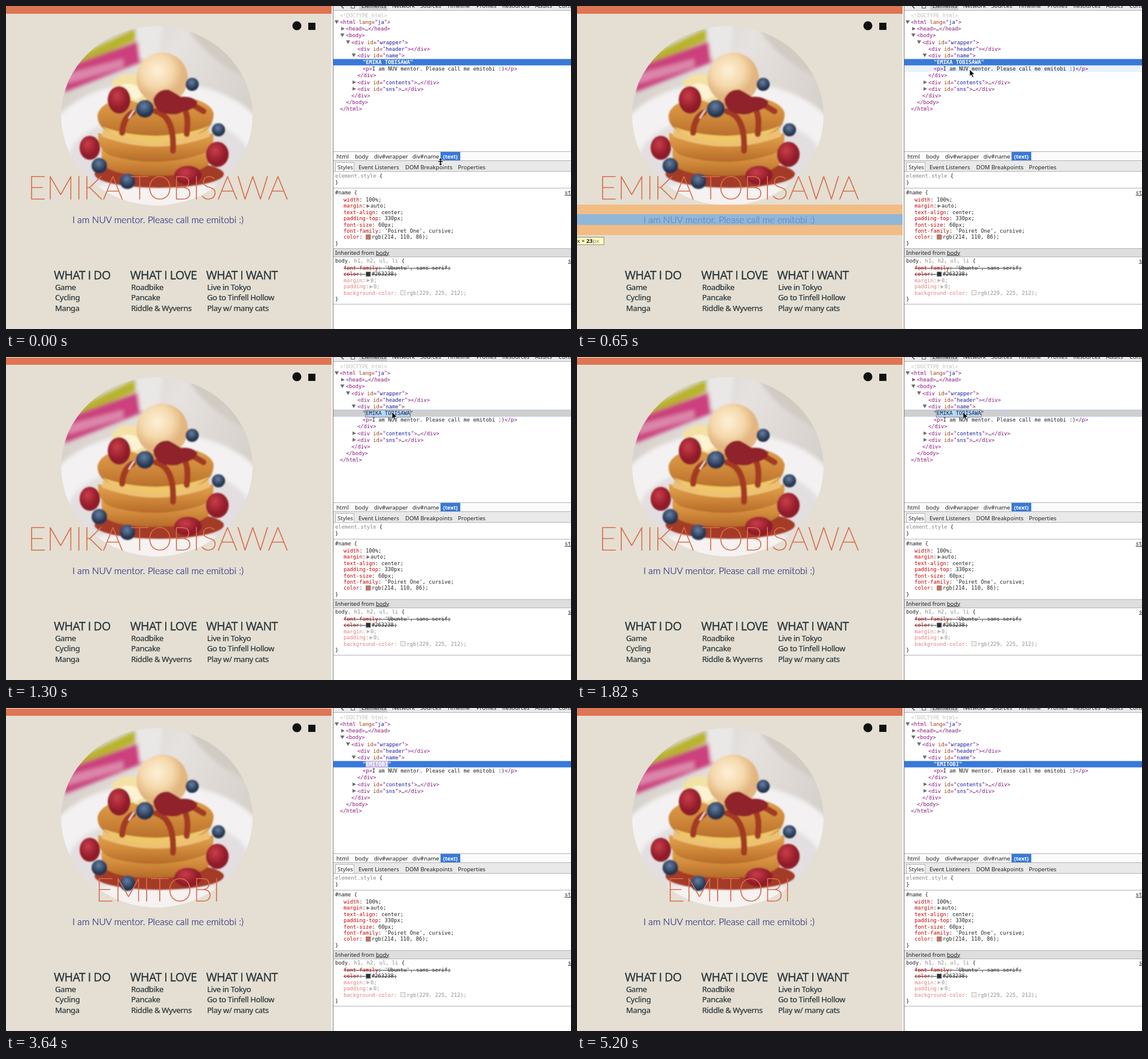
Recreate the animation shown at these times as an HTML page. Size 944 by 540 pixels, loop 5330 ms.

```html
<!DOCTYPE html>
<html lang="en">
<head>
<meta charset="utf-8">
<title>Editing a page in the inspector</title>
<style>
html, body { margin: 0; width: 100%; height: 100%; overflow: hidden; background: #fff; }
#stage { position: relative; width: 944px; height: 540px; overflow: hidden; }
svg { position: absolute; left: 0; top: 0; display: block; }
text { white-space: pre; }

/* web page */
.title { font: 200 53px Lato, sans-serif; letter-spacing: .5px; fill: #d96d4e; stroke: #d96d4e; stroke-width: 1px; text-anchor: middle; }
.intro { font: 300 15.6px Lato, sans-serif; fill: #23267f; stroke: #23267f; stroke-width: .2px; text-anchor: middle; }
.head { font: 500 19.5px "Open Sans", sans-serif; letter-spacing: -.5px; fill: #263238; stroke: #263238; stroke-width: .3px; }
.item { font: 13px "Noto Sans", sans-serif; letter-spacing: -.35px; fill: #263238; stroke: #263238; stroke-width: .2px; }

/* inspector */
.ui { font: 9.5px "Noto Sans", sans-serif; fill: #222; }
.tree, .css, .row { font: 8.75px "DejaVu Sans Mono", monospace; }
.tree { fill: #881280; }
.n { fill: #994500; }
.v { fill: #1a1aa6; }
.k { fill: #222; }
.css { fill: #222; }
.p { fill: #c80000; }
.dim { fill: #888; }
.bold { font-weight: bold; fill: #fff; }
.u { text-decoration: underline; }
.off { text-decoration: line-through; }
.line { stroke: #b4b4b4; }
.arrow { fill: #6e6e6e; }

.row { position: absolute; left: 547px; top: 89px; width: 397px; height: 10px; background: #cfcfcf; visibility: hidden; }
.row div { position: absolute; left: 49px; top: -.5px; display: flex; line-height: 11px; color: #333; }
.row b { font-weight: normal; color: #222; background: #fff; height: 11px; overflow: hidden; white-space: pre; box-shadow: 0 0 1px 1px #8c8c8c; }
#picked b { background: #b3d6fd; }

/* timeline: 41 steps of 130 ms */
.a { animation: 5.33s step-end infinite; }
#before, #oldNode { animation-name: before; }
#after, #newNode { animation-name: after; }
#edge { animation-name: edge; }
#resize { animation-name: resize; }
#cursor { animation-name: move, pointer; }
#hover { animation-name: hover; }
#whole { animation-name: whole; }
#para { animation-name: para; }
#picked { animation-name: picked; }
#typing { animation-name: typing; }
#typed { animation-name: type; }
#flash { animation-name: flash; }

@keyframes before { 0% { visibility: visible } 65.8%, 100% { visibility: hidden } }
@keyframes after { 0% { visibility: hidden } 65.8%, 100% { visibility: visible } }
@keyframes edge { 0%, 90.2%, 100% { visibility: hidden } 14.6% { visibility: visible } }
@keyframes resize { 0% { visibility: visible } 2.4%, 100% { visibility: hidden } }
@keyframes pointer {
  0%, 39%, 90.2%, 100% { visibility: hidden }
  2.4%, 78% { visibility: visible }
}
@keyframes move {
  0%, 2.4% { transform: translate(722px, 236px) }
  4.8% { transform: translate(710px, 200px) }
  7.3% { transform: translate(692px, 163px) }
  9.7% { transform: translate(675px, 133px) }
  12.1% { transform: translate(656px, 106px) }
  14.6% { transform: translate(645px, 92px) }
  80.4% { transform: translate(636px, 101px) }
  82.9% { transform: translate(628px, 108px) }
  85.3% { transform: translate(618px, 116px) }
  87.8%, 100% { transform: translate(600px, 135px) }
}
@keyframes hover {
  0%, 14.6%, 87.8%, 100% { transform: translateY(-20px) }
  7.3% { transform: translateY(166.5px) }
  9.7% { transform: translateY(144.3px) }
  12.1%, 80.4% { transform: translateY(99.5px) }
}
@keyframes whole { 0%, 12.1%, 100% { visibility: hidden } 7.3% { visibility: visible } }
@keyframes para { 0%, 14.6%, 87.8%, 100% { visibility: hidden } 12.1%, 80.4% { visibility: visible } }
@keyframes picked { 0%, 39%, 100% { visibility: hidden } 24.3% { visibility: visible } }
@keyframes typing { 0%, 65.8%, 100% { visibility: hidden } 39% { visibility: visible } }
@keyframes type {
  0%, 39% { width: 1ch }
  43.9% { width: 2ch }
  46.3% { width: 3ch }
  51.2% { width: 4ch }
  53.6% { width: 5ch }
  58.5% { width: 6ch }
  60.9%, 100% { width: 7ch }
}
@keyframes flash {
  0%, 73.1%, 100% { opacity: 0 }
  65.8% { opacity: 1 }
  68.2% { opacity: .8 }
  70.7% { opacity: .4 }
}
</style>
</head>
<body>
<div id="stage">
<svg width="944" height="540" viewBox="0 0 944 540">
  <defs>
    <clipPath id="oval"><ellipse cx="252" cy="183.5" rx="160" ry="150"/></clipPath>
    <linearGradient id="room" x2="1" y2=".6"><stop stop-color="#cfc8c2"/><stop offset=".5" stop-color="#e6e2df"/><stop offset="1" stop-color="#d3cdc7"/></linearGradient>
    <linearGradient id="cake" x2="0" y2="1"><stop stop-color="#e0a452"/><stop offset=".5" stop-color="#d0893a"/><stop offset="1" stop-color="#b56b2a"/></linearGradient>
    <radialGradient id="ice" cx=".4" cy=".35"><stop stop-color="#fdf0d8"/><stop offset=".6" stop-color="#f5d9ac"/><stop offset="1" stop-color="#e3b681"/></radialGradient>
    <radialGradient id="red" cx=".4" cy=".35"><stop stop-color="#c93d49"/><stop offset="1" stop-color="#8f1a29"/></radialGradient>
    <radialGradient id="blue" cx=".45" cy=".35"><stop stop-color="#6480a6"/><stop offset="1" stop-color="#27364f"/></radialGradient>
    <filter id="soft"><feGaussianBlur stdDeviation="3"/></filter>
    <filter id="smooth"><feGaussianBlur stdDeviation=".8"/></filter>
  </defs>

  <!-- web page -->
  <rect width="544" height="540" fill="#e4dfd2"/>
  <rect width="544" height="13" fill="#de7553"/>
  <rect id="edge" class="a" width="544" height="1" fill="#f0e9e4"/>
  <circle cx="486" cy="33" r="7.5" fill="#111"/>
  <rect x="505" y="28" width="12" height="12" fill="#111"/>

  <g clip-path="url(#oval)">
    <rect x="90" y="30" width="325" height="306" fill="url(#room)"/>
    <g filter="url(#soft)">
      <path d="M120 84L216 38V58L112 102Z" fill="#b8b42c"/>
      <path d="M94 104L224 58 230 92 98 144Z" fill="#cb3f7d"/>
      <path d="M100 114L196 88V102L102 130Z" fill="#dc86aa"/>
      <path d="M216 30L262 30 256 82 224 92Z" fill="#eae7e7"/>
      <path d="M300 30Q330 90 420 130V30Z" fill="#d2cbc4"/>
      <ellipse cx="252" cy="232" rx="184" ry="106" fill="#f3f1f1"/>
      <ellipse cx="256" cy="256" rx="152" ry="74" fill="#e3dfe0"/>
      <ellipse cx="252" cy="318" rx="130" ry="26" fill="#f5f2f1"/>
    </g>
    <g filter="url(#smooth)">
      <ellipse cx="256" cy="281" rx="108" ry="23" fill="#a43a26"/>
      <path d="M159 240Q250 276 341 240V262Q322 284 250 284 176 284 161 264Z" fill="url(#cake)"/>
      <path d="M154 212Q250 250 346 212Q350 240 326 248 250 272 174 250 152 240 154 212Z" fill="url(#cake)"/>
      <path d="M162 206Q250 248 338 204L341 218Q250 252 160 218Z" fill="#edc173"/>
      <path d="M153 182Q160 150 250 148 340 150 347 180 346 208 318 214 250 232 182 214 152 206 153 182Z" fill="url(#cake)"/>
      <path d="M162 202Q200 216 250 217 306 215 340 200 320 222 250 228 182 224 162 202Z" fill="#efc768"/>
      <g fill="none" stroke="#a23a24" stroke-width="10" stroke-linecap="round" stroke-linejoin="round">
        <path d="M212 178Q196 186 194 212M250 176Q282 184 279 242M296 170Q306 180 302 214M310 164L330 176"/>
      </g>
      <path d="M176 130Q190 108 222 116L250 146 224 163 190 151Z" fill="#f3e1a6"/>
      <path d="M184 137Q210 118 234 148L216 157Z" fill="#fbf3d2"/>
      <circle cx="261" cy="121" r="43" fill="url(#ice)"/>
      <path d="M246 156Q254 138 272 140 284 146 292 152 310 150 320 160 316 174 296 176 286 184 268 180 248 176 246 156Z" fill="#8f2029"/>
      <g fill="url(#red)">
        <ellipse cx="189" cy="157" rx="19" ry="23"/>
        <ellipse cx="140" cy="237" rx="17" ry="20"/>
        <ellipse cx="353" cy="248" rx="19" ry="21"/>
        <ellipse cx="304" cy="283" rx="23" ry="16"/>
      </g>
      <g fill="url(#blue)">
        <circle cx="232" cy="172" r="15"/>
        <circle cx="311" cy="131" r="11"/>
        <circle cx="355" cy="207" r="11"/>
        <circle cx="156" cy="267" r="13"/>
        <circle cx="203" cy="293" r="13"/>
      </g>
      <path d="M205 188L214 174" stroke="#fff" stroke-width="2"/>
    </g>
  </g>

  <text id="before" class="title a" x="254" y="323">EMIKA TOBISAWA</text>
  <text id="after" class="title a" x="254" y="323">EMITOBI</text>
  <text class="intro" x="254" y="363">I am NUV mentor. Please call me emitobi :)</text>
  <g class="head">
    <text x="80" y="457">WHAT I DO</text>
    <text x="207.5" y="457">WHAT I LOVE</text>
    <text x="334.5" y="457">WHAT I WANT</text>
  </g>
  <g class="item">
    <text x="82" y="474.5">Game</text><text x="82" y="492.3">Cycling</text><text x="82" y="510">Manga</text>
    <text x="209" y="474.5">Roadbike</text><text x="209" y="492.3">Pancake</text><text x="209" y="510">Riddle &amp; Wyverns</text>
    <text x="336" y="474.5">Live in Tokyo</text><text x="336" y="492.3">Go to Tinfell Hollow</text><text x="336" y="510">Play w/ many cats</text>
  </g>

  <!-- element highlights -->
  <rect id="whole" class="a" width="544" height="540" fill="rgba(111,168,220,.7)"/>
  <g id="para" class="a">
    <path d="M0 332H544V348H0ZM0 366H544V383H0Z" fill="rgba(246,178,107,.75)"/>
    <rect y="348" width="544" height="18" fill="rgba(111,168,220,.72)"/>
    <rect x="-5" y="386.5" width="50" height="12.5" fill="#fffcc4" stroke="#8d8a72"/>
    <text class="ui" x="0" y="396">x × <tspan font-weight="bold">23</tspan><tspan class="dim">px</tspan></text>
  </g>

  <!-- inspector -->
  <rect x="544" width="400" height="540" fill="#fff"/>
  <path d="M546.5 0V540" stroke="#777"/>
  <rect x="547" width="397" height="7" fill="#e9e9e9"/>
  <rect x="590" width="47" height="7" fill="#cdcdcd"/>
  <path d="M547 7.5H944" class="line"/>
  <path d="M560 0L564 4" stroke="#444" stroke-width="1.6"/>
  <path d="M576.5 -4V3.5H582.5V-4" fill="none" stroke="#555"/>
  <g class="ui">
    <text x="594" y="2.5">Elements</text><text x="645" y="2.5">Network</text><text x="692" y="2.5">Sources</text>
    <text x="737" y="2.5">Timeline</text><text x="786" y="2.5">Profiles</text><text x="829" y="2.5">Resources</text>
    <text x="884" y="2.5">Audits</text><text x="923" y="2.5">Console</text>
  </g>

  <rect id="hover" class="a" x="547" width="397" height="11" fill="#e9f1fb"/>
  <rect x="547" y="88.6" width="397" height="10.7" fill="#3879d9"/>
  <rect id="flash" class="a" x="601" y="89" width="37.5" height="10" fill="#efc9e6"/>
  <path class="arrow" d="M549 24H556L552.5 30ZM560 35V41L566 38ZM558.5 46H565.5L562 52ZM568 57.5H575L571.5 63.5ZM577.5 79.5H584.5L581 85.5ZM579 124.5V130.5L585 127.5ZM579 135.5V141.5L585 138.5Z"/>
  <g class="tree">
    <text x="558" y="19" fill="#c0c0c0">&lt;!DOCTYPE html&gt;</text>
    <text x="558" y="30">&lt;html <tspan class="n">lang</tspan>="<tspan class="v">ja</tspan>"&gt;</text>
    <text x="568" y="41">&lt;head&gt;<tspan class="k">…</tspan>&lt;/head&gt;</text>
    <text x="568" y="52">&lt;body&gt;</text>
    <text x="577" y="63.5">&lt;div <tspan class="n">id</tspan>="<tspan class="v">wrapper</tspan>"&gt;</text>
    <text x="587" y="74.5">&lt;div <tspan class="n">id</tspan>="<tspan class="v">header</tspan>"&gt;&lt;/div&gt;</text>
    <text x="587" y="85.5">&lt;div <tspan class="n">id</tspan>="<tspan class="v">name</tspan>"&gt;</text>
    <text id="oldNode" class="bold a" x="596" y="97">"EMIKA TOBISAWA"</text>
    <text id="newNode" class="bold a" x="596" y="97">"EMITOBI"</text>
    <text x="596" y="108">&lt;p&gt;<tspan class="k">I am NUV mentor. Please call me emitobi :)</tspan>&lt;/p&gt;</text>
    <text x="587" y="119">&lt;/div&gt;</text>
    <text x="587" y="130.5">&lt;div <tspan class="n">id</tspan>="<tspan class="v">contents</tspan>"&gt;<tspan class="k">…</tspan>&lt;/div&gt;</text>
    <text x="587" y="141.5">&lt;div <tspan class="n">id</tspan>="<tspan class="v">sns</tspan>"&gt;<tspan class="k">…</tspan>&lt;/div&gt;</text>
    <text x="577" y="152.5">&lt;/div&gt;</text>
    <text x="568" y="164">&lt;/body&gt;</text>
    <text x="558" y="175">&lt;/html&gt;</text>
  </g>

  <rect x="547" y="244" width="397" height="15" fill="#fbfbfb"/>
  <rect x="726" y="244" width="33" height="14" fill="#3879d9"/>
  <rect x="547" y="259" width="397" height="17" fill="#e9e9e9"/>
  <rect x="550.5" y="261.5" width="31" height="15" fill="#fff" class="line"/>
  <rect x="547" y="405" width="397" height="14" fill="#dedede"/>
  <path class="line" d="M547 243.5H944M547 258.5H944M547 276.5H944M547 304.5H944M547 405.5H944M547 419.5H944M547 498.5H944"/>
  <g class="ui">
    <text x="552" y="254.5">html</text><text x="583" y="254.5">body</text><text x="615" y="254.5">div#wrapper</text>
    <text x="679" y="254.5">div#name</text><text class="bold" x="742.5" y="254.5" text-anchor="middle" font-size="9">(text)</text>
    <text x="554" y="272.5">Styles</text><text x="589" y="272.5">Event Listeners</text>
    <text x="667" y="272.5">DOM Breakpoints</text><text x="755" y="272.5">Properties</text>
    <text x="550" y="415.5">Inherited from <tspan class="u">body</tspan></text>
  </g>
  <g class="css">
    <text x="550" y="287"><tspan class="dim">element.style</tspan> {</text>
    <text x="550" y="298">}</text>
    <text x="550" y="315">#name {</text>
    <text class="u" x="933.5" y="315">style.css</text>
    <text x="564" y="327"><tspan class="p">width</tspan>: 100%;</text>
    <text x="564" y="337.4"><tspan class="p">margin</tspan>:<tspan x="609">auto;</tspan></text>
    <text x="564" y="347.8"><tspan class="p">text-align</tspan>: center;</text>
    <text x="564" y="358.2"><tspan class="p">padding-top</tspan>: 330px;</text>
    <text x="564" y="368.6"><tspan class="p">font-size</tspan>: 60px;</text>
    <text x="564" y="379"><tspan class="p">font-family</tspan>: 'Poiret One', cursive;</text>
    <text x="564" y="389.4"><tspan class="p">color</tspan>:<tspan x="611">rgb(214, 110, 86);</tspan></text>
    <rect x="601.5" y="382.5" width="7.5" height="7.5" fill="#d66e56" stroke="#888"/>
    <path class="arrow" d="M602.5 331.5V337.5L608 334.5Z"/>
    <text x="550" y="399.5">}</text>

    <text x="550" y="429">body<tspan class="dim">, h1, h2, ul, li</tspan> {</text>
    <text class="u" x="939" y="429">style.css</text>
    <text class="off" x="564" y="441"><tspan class="p">font-family</tspan>: 'Ubuntu', sans serif;</text>
    <text class="off" x="564" y="451.4"><tspan class="p">color</tspan>: <tspan x="611">#263238;</tspan></text>
    <rect x="601.5" y="444.5" width="7.5" height="7.5" fill="#263238" stroke="#888"/>
    <g opacity=".5">
      <text x="564" y="461.8"><tspan class="p">margin</tspan>:<tspan x="609">0;</tspan></text>
      <text x="564" y="472.2"><tspan class="p">padding</tspan>:<tspan x="614">0;</tspan></text>
      <text x="564" y="482.6"><tspan class="p">background-color</tspan>:<tspan x="669.5">rgb(229, 225, 212);</tspan></text>
      <rect x="659.5" y="475.5" width="7.5" height="7.5" fill="#e5e1d4" stroke="#888"/>
      <path class="arrow" d="M602.5 456V462L608 459ZM607.5 466.5V472.5L613 469.5Z"/>
    </g>
    <text x="550" y="493">}</text>
  </g>
</svg>

<div id="picked" class="row a"><div>"<b>EMIKA TOBISAWA</b>"</div></div>
<div id="typing" class="row a"><div>"<b id="typed" class="a">EMITOBI</b>"</div></div>

<svg width="944" height="540" viewBox="0 0 944 540">
  <path id="resize" class="a" d="M726 254L729 257.5H727V259H730V261H727V263.5H729L726 267 723 263.5H725V261H722V259H725V257.5H723Z" fill="#000" stroke="#fff" stroke-width=".6"/>
  <path id="cursor" class="a" d="M0 0V11.5L2.7 9 4.6 13.4 6.6 12.5 4.7 8.3H8.3Z" fill="#000" stroke="#fff" stroke-width=".8"/>
</svg>
</div>
</body>
</html>
```
